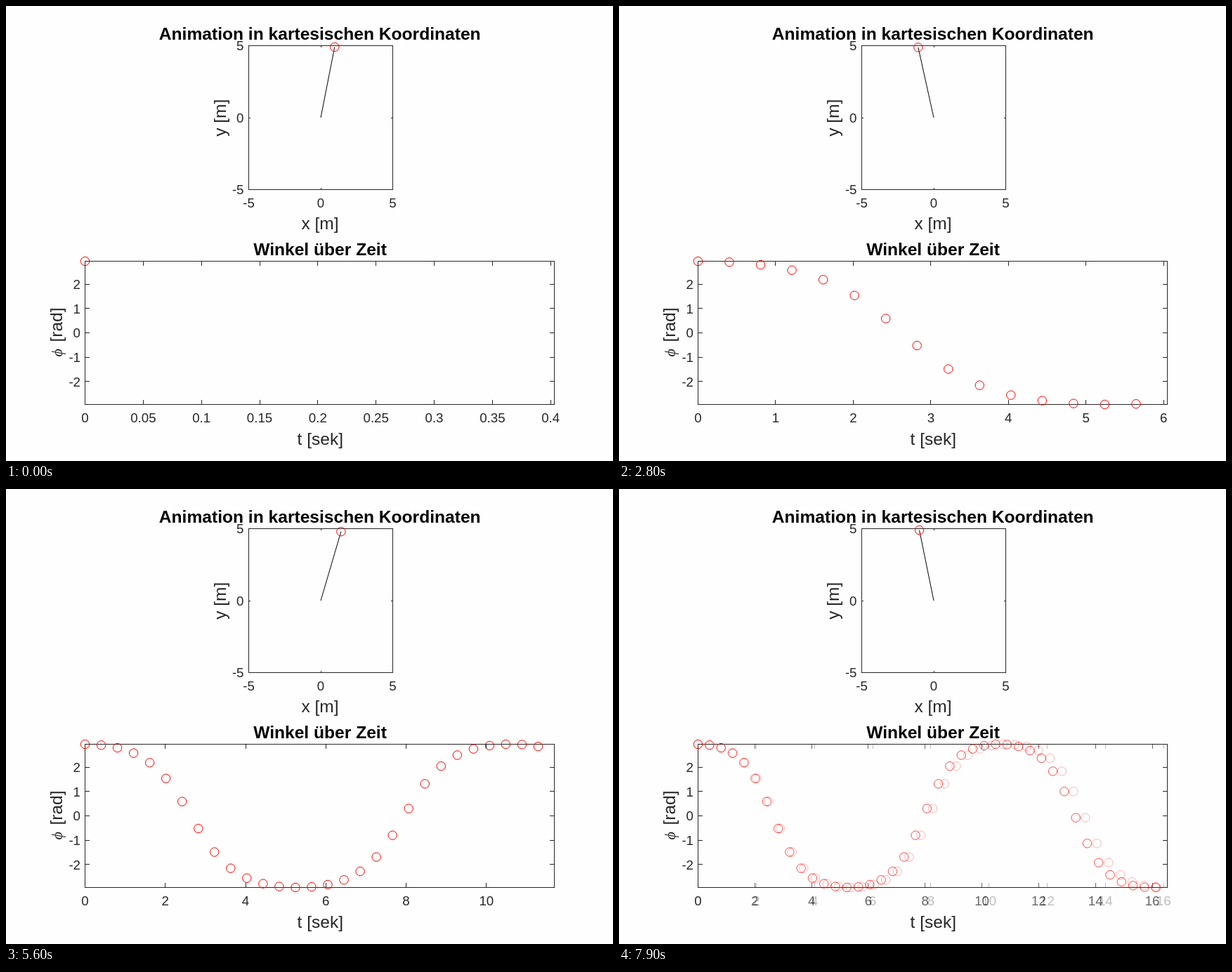
An HTML page with a canvas that plays this animation: 864x648 px, repeating every 8 s.

```html
<!DOCTYPE html>
<html lang="de">
<head>
<meta charset="utf-8">
<title>Pendel</title>
<style>
html, body { margin: 0; width: 100%; height: 100%; overflow: hidden; background: #fefefe; }
canvas { display: block; }
</style>
</head>
<body>
<canvas id="stage" width="864" height="648"></canvas>
<script>
const W = 864, H = 648;
const LOOP = 8000, TICK = 100;
const DT = 0.4032;          // simulated seconds between samples
const STEPS = 40;
const PHI0 = 2.9475;
const LENGTH = 5, GRAVITY = 9.81;
const FADE = 0.7;           // weight of the new picture halfway between samples
const INK = '#262626';
const SANS = '"Liberation Sans", Arial, sans-serif';
const SMALL = '18.7px ' + SANS;
const LARGE = '24.5px ' + SANS;
const BOLD = 'bold 24.6px ' + SANS;

const swing = { x: 345.5, y: 56.5, w: 205, h: 205 };
const graph = { x: 112.5, y: 363.5, w: 668, h: 204 };

const stage = document.getElementById('stage').getContext('2d');
const layer = document.createElement('canvas');
layer.width = W;
layer.height = H;
const g = layer.getContext('2d');

const angles = simulate();

// Undamped pendulum, leapfrog integration
function simulate() {
  const sub = 400, h = DT / sub;
  const acc = a => -GRAVITY / LENGTH * Math.sin(a);
  const list = [PHI0];
  let a = PHI0, v = -0.0106;
  for (let i = 0; i < STEPS; i++) {
    for (let j = 0; j < sub; j++) {
      v += acc(a) * h / 2;
      a += v * h;
      v += acc(a) * h / 2;
    }
    list.push(a);
  }
  return list;
}

function text(str, x, y, font, align = 'center', color = INK) {
  g.font = font;
  g.textAlign = align;
  g.fillStyle = color;
  g.fillText(str, x, y);
}

function upright(x, y, draw) {
  g.save();
  g.translate(x, y);
  g.rotate(-Math.PI / 2);
  draw();
  g.restore();
}

function line(x1, y1, x2, y2, color = INK) {
  g.strokeStyle = color;
  g.beginPath();
  g.moveTo(x1, y1);
  g.lineTo(x2, y2);
  g.stroke();
}

function marker(x, y) {
  g.strokeStyle = '#ff0000';
  g.beginPath();
  g.arc(x, y, 6.2, 0, 2 * Math.PI);
  g.stroke();
}

function frame(b) {
  g.strokeStyle = INK;
  g.strokeRect(b.x, b.y, b.w, b.h);
}

const snap = v => Math.floor(v) + 0.5;

function xTick(b, x, size) {
  x = snap(x);
  line(x, b.y, x, b.y + size);
  line(x, b.y + b.h, x, b.y + b.h - size);
}

function yTick(b, y, size) {
  y = snap(y);
  line(b.x, y, b.x + size, y);
  line(b.x + b.w, y, b.x + b.w - size, y);
}

// Smallest step of the form 1, 2 or 5 times a power of ten
function tickStep(max) {
  for (let p = -2; p < 2; p++) {
    for (const m of [1, 2, 5]) {
      const step = m * 10 ** p;
      if (max / step < 11) return step;
    }
  }
  return max;
}

function drawSwing(phi) {
  const cx = swing.x + swing.w / 2, cy = swing.y + swing.h / 2;
  const scale = swing.w / 10;
  frame(swing);
  xTick(swing, cx, 2.5);
  yTick(swing, cy, 2.5);
  for (const v of [-5, 0, 5]) {
    text(v, cx + v * scale, 286.7, SMALL);
    text(v, 338.5, cy - v * scale + 6.5, SMALL, 'right');
  }
  text('Animation in kartesischen Koordinaten', 446.7, 47.5, BOLD, 'center', '#000');
  text('x [m]', 447, 318.3, LARGE);
  upright(312.5, 159.3, () => text('y [m]', 0, 0, LARGE));

  const x = cx + LENGTH * Math.sin(phi) * scale;
  const y = cy + LENGTH * Math.cos(phi) * scale;
  line(cx, cy, x, y, '#000');
  marker(x, y);
}

function drawGraph(n) {
  const max = (n + 1) * DT;
  const step = tickStep(max);
  const mid = graph.y + graph.h / 2;
  const px = t => graph.x + t / max * graph.w;
  const py = a => mid - a / PHI0 * graph.h / 2;

  frame(graph);
  for (let i = 0; i * step <= max; i++) {
    const t = i * step;
    xTick(graph, px(t), 6.5);
    text(String(+t.toFixed(2)), px(t), 592.8, SMALL);
  }
  for (let a = -2; a <= 2; a++) {
    yTick(graph, py(a), 6.5);
    text(a, 106, py(a) + 6.8, SMALL, 'right');
  }
  text('Winkel über Zeit', 447, 355, BOLD, 'center', '#000');
  text('t [sek]', 447.3, 624.5, LARGE);
  upright(80, 499.5, () => {
    text('ϕ', 0, 0, 'italic 22px "Liberation Serif", "Noto Serif", serif', 'left');
    text('[rad]', 70, 0, LARGE, 'right');
  });

  for (let i = 0; i <= n; i++) marker(px(i * DT), py(angles[i]));
}

function scene(n, alpha) {
  g.fillStyle = '#fefefe';
  g.fillRect(0, 0, W, H);
  g.lineWidth = 1;
  drawSwing(angles[n]);
  drawGraph(n);
  stage.globalAlpha = alpha;
  stage.drawImage(layer, 0, 0);
}

let start = null, shown = -1;

function play(now) {
  if (start === null) start = now;
  const k = Math.floor(((now - start) % LOOP) / TICK);
  if (k !== shown) {
    shown = k;
    const n = Math.floor(k / 2);
    scene(n, 1);
    if (k % 2) scene(n + 1, FADE);
  }
  requestAnimationFrame(play);
}
requestAnimationFrame(play);
</script>
</body>
</html>
```
